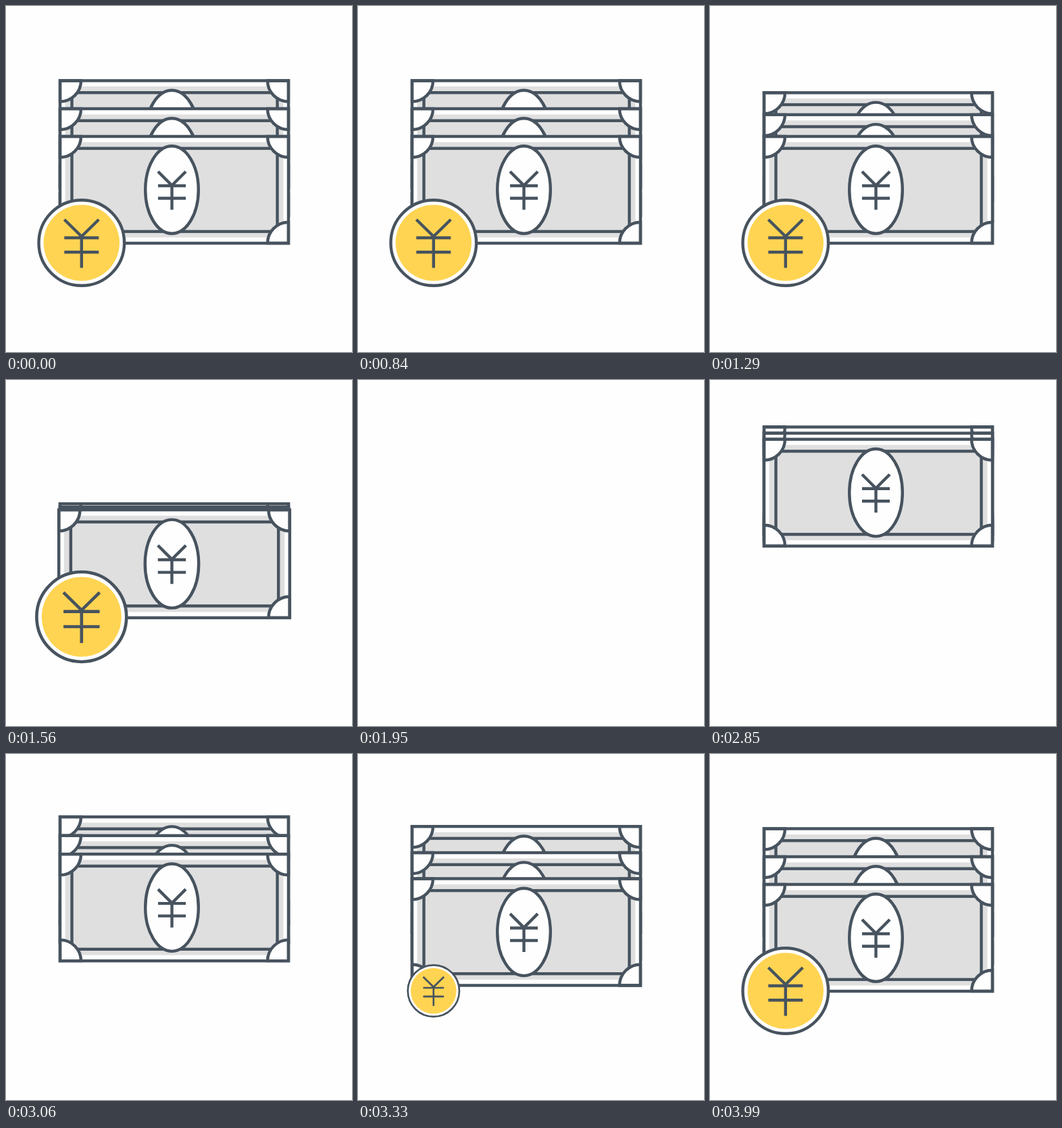
Write an HTML page that moves like this. It is 512x512 px and loops after 4500 ms.

```html
<!DOCTYPE html>
<html lang="en">
<head>
<meta charset="utf-8">
<title>Yen notes and coin</title>
<style>
  html, body { margin: 0; width: 100%; height: 100%; overflow: hidden; background: #fefefe; }
  svg { display: block; width: 100%; height: 100%; }
  .line { fill: none; stroke: #47535e; stroke-width: 4.4; }
  .white { fill: #fefefe; }
</style>
</head>
<body>
<svg id="stage" viewBox="0 0 512 512"></svg>
<script>
const LOOP = 4500;
const NOTE_X = 249;
const REST_Y = [189.5, 231, 272];   // back, middle, front note centres
const RAISED_Y = 137;
const COIN = { x: 111.8, y: 350.5 };

const clamp = v => Math.min(1, Math.max(0, v));
const mix = (a, b, k) => a + (b - a) * k;
const smooth = u => u * u * (3 - 2 * u);
const span = (t, start, end) => clamp((t - start) / (end - start));
const ease = (t, start, end) => smooth(span(t, start, end));

// Cubic Bezier timing with control points (x1, 0) and (x2, 1).
function bezier(x, x1, x2) {
  let lo = 0, hi = 1;
  for (let i = 0; i < 24; i++) {
    const u = (lo + hi) / 2, v = 1 - u;
    if (3 * v * v * u * x1 + 3 * v * u * u * x2 + u * u * u < x) lo = u;
    else hi = u;
  }
  return smooth((lo + hi) / 2);
}

function yen(w, top, join, bar1, bar2, bottom) {
  return `<path class="line" d="M${-w} ${top}L0 ${join}L${w} ${top}M0 ${join}V${bottom}
    M${-w} ${bar1}H${w}M${-w} ${bar2}H${w}"/>`;
}

function note() {
  const corners = [[-1, -1], [1, -1], [1, 1], [-1, 1]].map(([sx, sy]) => {
    const x = 169 * sx, y = 79 * sy, r = 31;
    return `<path class="line white" d="M${x - r * sx} ${y}
      A${r} ${r} 0 0 ${sx * sy > 0 ? 1 : 0} ${x} ${y - r * sy}L${x} ${y}Z"/>`;
  }).join('');
  return `<g>
    <rect class="white" x="-169" y="-79" width="338" height="158"/>
    <rect x="-161.5" y="-70.5" width="323" height="141" fill="#dfdfe0"/>
    <rect class="line" x="-151.5" y="-61.3" width="304" height="123"/>
    ${corners}
    <rect class="line" x="-169" y="-79" width="338" height="158"/>
    <g transform="translate(-3.5 0)">
      <ellipse class="line white" rx="39.3" ry="64.7"/>
      ${yen(20.5, -27, -6.5, -6, 12.5, 29.5)}
    </g>
  </g>`;
}

const coinShape = `<g>
  <circle class="line white" r="63.3"/>
  <circle r="56.2" fill="#ffd452"/>
  ${yen(25.5, -34.5, -9.5, -7.5, 13.8, 37)}
</g>`;

const stage = document.getElementById('stage');
stage.innerHTML = note() + note() + note() + coinShape;
const [back, middle, front, coin] = stage.children;

function place(el, x, y, scale, visible = true) {
  el.setAttribute('visibility', visible && scale > 0.002 ? 'visible' : 'hidden');
  el.setAttribute('transform', `translate(${x} ${y}) scale(${scale})`);
}

// Swell then vanish; later pop in past full size and settle.
function bounce(t, out, into) {
  if (t < out[1]) return mix(1, 1.055, ease(t, out[0], out[1]));
  if (t < out[2]) return mix(1.055, 0, ease(t, out[1], out[2]));
  if (t < into[1]) return mix(0, 1.103, ease(t, into[0], into[1]));
  return mix(1.103, 1, ease(t, into[1], into[2]));
}

function render(t) {
  const raised = t > 2100;
  const fold = bezier(span(t, 1125, 1680), 0.33, 0.67);
  const drop = bezier(span(t, 2630, 3610), 0.33, 0.27);
  const y = REST_Y.map(rest => raised ? mix(RAISED_Y, rest, drop) : mix(rest, REST_Y[2], fold));
  const stacked = t < 1680 || t > 2630;

  place(back, NOTE_X, y[0], 1, stacked);
  place(middle, NOTE_X, y[1], 1, stacked);
  place(front, NOTE_X, y[2], bounce(t, [1490, 1740, 1950], [2265, 2515, 2765]));
  place(coin, COIN.x, COIN.y, bounce(t, [1370, 1607, 1820], [3140, 3500, 3960]));
}

const began = performance.now();
function tick() {
  render((performance.now() - began) % LOOP);
  requestAnimationFrame(tick);
}
tick();
</script>
</body>
</html>
```
